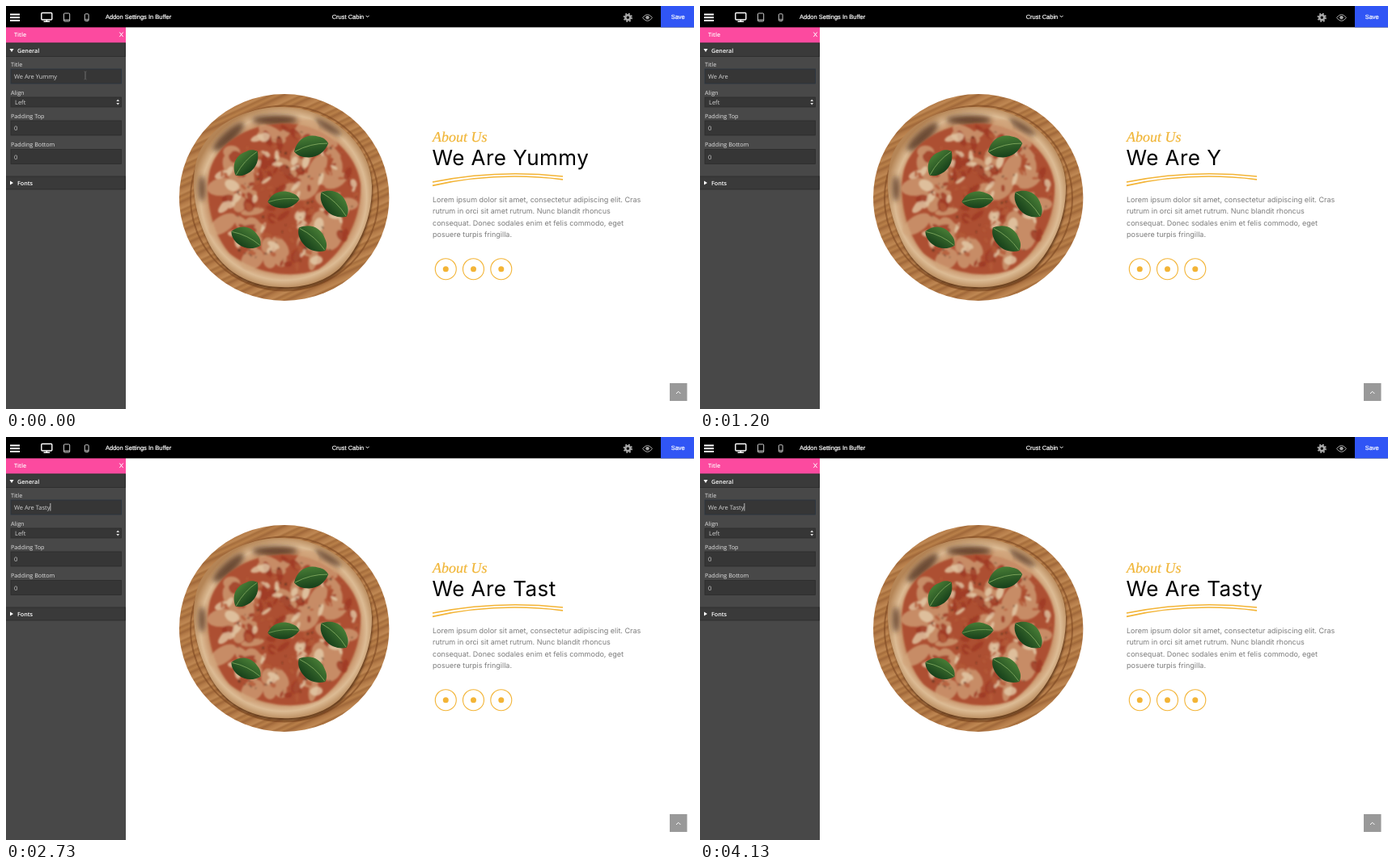
Animation, 850 px wide and 499 px high, one loop 4.19 s. Source, as an HTML page:

```html
<!DOCTYPE html>
<html lang="en">
<head>
<meta charset="utf-8">
<title>Page builder</title>
<style>
  html, body { margin: 0; width: 100%; height: 100%; overflow: hidden; background: #fff; }
  svg { display: block; width: 850px; height: 499px; }
  text { white-space: pre; text-rendering: geometricPrecision; }
  .bar { font: 7.5px "Liberation Sans", Arial, sans-serif; fill: #fff; stroke: #fff; stroke-width: .2; }
  .panel { font: 7.2px "Open Sans", sans-serif; fill: #e2e2e2; }
  .panel .head { font-weight: 600; fill: #fff; }
  .panel .value { font-size: 7.5px; fill: #d2d2d2; }
  .box { fill: #363636; stroke: #2c2c2c; stroke-width: .8; }
  .script { font: italic 18px "Liberation Serif", serif; fill: #f0b537; stroke: #f0b537; stroke-width: .2; }
  .heading { font: 26px Inter, sans-serif; letter-spacing: .45px; fill: #000; }
  .copy { font: 9px Inter, sans-serif; fill: #7c7c7c; }
  .line { fill: none; stroke: #fff; }
  .gold { fill: none; stroke: #f3b436; }
</style>
</head>
<body>
<svg viewBox="0 0 850 499">
  <defs>
    <linearGradient id="wood" gradientUnits="userSpaceOnUse" x1="0" y1="0" x2="7" y2="15" spreadMethod="repeat">
      <stop offset="0" stop-color="#b47b48"/>
      <stop offset=".25" stop-color="#bf8853"/>
      <stop offset=".4" stop-color="#a56d3c"/>
      <stop offset=".6" stop-color="#b98049"/>
      <stop offset=".8" stop-color="#a0683a"/>
      <stop offset="1" stop-color="#b47b48"/>
    </linearGradient>
    <radialGradient id="crust" gradientUnits="userSpaceOnUse" cx="343" cy="237" r="114">
      <stop offset=".76" stop-color="#b9774c"/>
      <stop offset=".9" stop-color="#dcbb94"/>
      <stop offset="1" stop-color="#b58556"/>
    </radialGradient>
    <linearGradient id="leaf" x1="0" y1="0" x2="0" y2="1">
      <stop offset="0" stop-color="#477c35"/>
      <stop offset="1" stop-color="#17401a"/>
    </linearGradient>
    <filter id="soft"><feGaussianBlur stdDeviation=".8"/></filter>
    <filter id="softer"><feGaussianBlur stdDeviation="3"/></filter>
    <path id="dough" d="M338 125C400 124 451 170 452 222C453 262 436 300 412 325C385 349 350 350 325 347C290 342 262 322 247 286C233 255 226 215 238 183C254 146 296 126 338 125Z"/>
    <clipPath id="inDough"><use href="#dough"/></clipPath>
    <g id="basil">
      <path d="M-20 3C-15-10-3-16 10-10C16-8 18-5 20-1C15 8 6 13-4 12C-12 11-17 8-20 3Z" fill="url(#leaf)"/>
      <path d="M-19 3Q0-4 19-1" fill="none" stroke="#7fa75e" stroke-width=".8"/>
    </g>
  </defs>

  <rect width="850" height="499" fill="#fff"/>

  <!-- Pizza picture -->
  <ellipse cx="343.7" cy="237" rx="129.7" ry="128" fill="url(#wood)"/>
  <ellipse cx="344" cy="238" rx="116" ry="114.5" fill="none" stroke="#7d4822" stroke-width="2" opacity=".6"/>
  <use href="#dough" fill="#4a2611" opacity=".65" transform="translate(1 3)" filter="url(#soft)"/>
  <use href="#dough" fill="url(#crust)"/>
  <g clip-path="url(#inDough)">
    <g fill="#4f2d1a" opacity=".8" filter="url(#softer)">
      <ellipse cx="275" cy="162" rx="25" ry="7" transform="rotate(-42 275 162)"/>
      <ellipse cx="332" cy="141" rx="28" ry="6"/>
      <ellipse cx="398" cy="150" rx="19" ry="4" transform="rotate(32 398 150)"/>
      <ellipse cx="242" cy="226" rx="4" ry="16"/>
    </g>
    <path d="M335 146C388 141 433 179 438 220C440 266 414 308 386 326C350 340 304 329 276 306C252 278 245 230 252 203C263 167 299 149 335 146Z" fill="#ad4f33" filter="url(#soft)"/>
    <g id="toppings" filter="url(#soft)"></g>
  </g>
  <use href="#basil" transform="translate(296.500 194) rotate(-42)"/>
  <use href="#basil" transform="translate(377 174) rotate(-8) scale(1.08)"/>
  <use href="#basil" transform="translate(343 240) scale(.98 .85)"/>
  <use href="#basil" transform="translate(406 245) rotate(50) scale(1.08)"/>
  <use href="#basil" transform="translate(297 287) rotate(32)"/>
  <use href="#basil" transform="translate(379 288) rotate(47) scale(1.08)"/>

  <!-- Page copy -->
  <text class="script" x="527" y="168">About Us</text>
  <text class="heading" id="heading" x="526.500" y="197"></text>
  <g class="gold" stroke-width="1.700">
    <path d="M527 218Q606 202 688 211"/>
    <path d="M527 222.300Q606 204.500 688 214.800"/>
  </g>
  <g class="copy">
    <text x="527" y="243">Lorem ipsum dolor sit amet, consectetur adipiscing elit. Cras</text>
    <text x="527" y="257.400">rutrum in orci sit amet rutrum. Nunc blandit rhoncus</text>
    <text x="527" y="271.800">consequat. Donec sodales enim et felis commodo, eget</text>
    <text x="527" y="286.200">posuere turpis fringilla.</text>
  </g>
  <g class="gold" stroke-width="1.100">
    <circle cx="543.300" cy="325.700" r="13"/>
    <circle cx="577.500" cy="325.700" r="13"/>
    <circle cx="611.800" cy="325.700" r="13"/>
  </g>
  <g fill="#f3b436">
    <circle cx="543.300" cy="325.700" r="3.500"/>
    <circle cx="577.500" cy="325.700" r="3.500"/>
    <circle cx="611.800" cy="325.700" r="3.500"/>
  </g>
  <rect x="820" y="467" width="21.500" height="22" fill="#999"/>
  <path class="line" d="M828 480l2.700-2.700 2.700 2.700"/>

  <!-- Settings panel -->
  <rect y="26" width="148" height="473" fill="#484848"/>
  <rect y="26" width="148" height="19.500" fill="#fc4a9f"/>
  <g fill="#3a3a3a" stroke="#2b2b2b" stroke-width=".8">
    <rect x="-1" y="46" width="148.600" height="16.500"/>
    <rect x="-1" y="211" width="148.600" height="16"/>
  </g>
  <path d="M4.500 53h5l-2.500 4zM5 216.500v5l4-2.500z" fill="#fff"/>
  <rect class="box" x="6" y="78" width="136.500" height="18" style="stroke:#2a3440"/>
  <rect class="box" x="6" y="113" width="136.500" height="12"/>
  <rect class="box" x="6" y="142" width="136.500" height="18"/>
  <rect class="box" x="6" y="177.500" width="136.500" height="18"/>
  <path d="M136.300 118l1.900-2.500 1.900 2.500zM136.300 120l1.900 2.500 1.900-2.500z" fill="#ddd"/>
  <g class="panel">
    <text class="head" x="10" y="37.500">Title</text>
    <text class="head" x="14" y="58">General</text>
    <text x="6" y="74.500">Title</text>
    <text class="value" id="field" x="10" y="89.500"></text>
    <text x="6" y="110">Align</text>
    <text class="value" x="11" y="121.500">Left</text>
    <text x="6" y="139">Padding Top</text>
    <text class="value" x="10" y="154">0</text>
    <text x="6" y="174.300">Padding Bottom</text>
    <text class="value" x="10" y="189.500">0</text>
    <text class="head" x="14" y="222">Fonts</text>
  </g>
  <path class="line" d="M140.300 32.500l4.400 5.600m0-5.600l-4.400 5.600"/>
  <rect id="caret" y="82" width=".8" height="9.500" fill="#ddd"/>
  <path id="beam" d="M-1.500-5Q0-5 0-3.500V3.500Q0 5-1.500 5M1.500-5Q0-5 0-3.500V3.500Q0 5 1.500 5" fill="none" stroke="#666" stroke-width=".8"/>
  <path id="arrow" d="M0 0v8l1.800-1.700 1.300 2.900 1.400-.6-1.300-2.800h2.500z" fill="#111" stroke="#fff" stroke-width=".7"/>

  <!-- Top bar -->
  <rect width="850" height="26.400" fill="#000"/>
  <rect x="809" width="41" height="26.400" fill="#3055f5"/>
  <path class="line" stroke-width="2" d="M5 10.500h12M5 14.300h12M5 18.100h12"/>
  <rect class="line" x="43.800" y="8.500" width="13" height="8.500" rx="1" stroke-width="1.400"/>
  <path class="line" stroke-width="1.500" d="M50.300 17v2M46.500 19.300h7.600"/>
  <g stroke="#ccc" fill="none">
    <rect x="71.500" y="9" width="7.200" height="10" rx="1"/>
    <path d="M72 17.200h6.500"/>
    <rect x="97.300" y="9.800" width="4.800" height="8.700" rx="1"/>
    <path d="M97.500 16.800h4.500"/>
  </g>
  <text class="bar" x="123" y="16">Addon Settings In Buffer</text>
  <text class="bar" x="402.700" y="15.500">Crust Cabin</text>
  <path class="line" d="M444.600 11.800l2 2 2-2"/>
  <text class="bar" x="821.700" y="16">Save</text>
  <g fill="none" stroke="#aaa">
    <circle cx="768.300" cy="14.300" r="3" stroke-width="2.600"/>
    <circle cx="768.300" cy="14.300" r="4.800" stroke-width="1.800" stroke-dasharray="1.885"/>
    <path d="M786.500 14.500Q792.500 6.500 798.500 14.500Q792.500 22.500 786.500 14.500Z"/>
    <circle cx="792.500" cy="14.300" r="1.800" fill="#aaa"/>
  </g>
</svg>

<script>
const LOOP = 4190, STEP = 200 / 3, LAG = 200;
const PREFIX = "We Are ";
const typing = [
  [0, "Yummy"], [200, "Yumm"], [370, "Yum"], [530, "Yu"], [800, "Y"], [1060, ""],
  [1530, "T"], [1800, "Ta"], [2070, "Tas"], [2330, "Tast"], [2600, "Tasty"]
];
const caretOn = [[130, 1130], [1530, 3130], [3630, LOOP]];
const pointer = [[2930, 98, 86], [3180, 132, 67], [3400, 132, 67], [3700, 98, 86]];

const el = id => document.getElementById(id);
const [heading, field, caret, beam, arrow] =
  ["heading", "field", "caret", "beam", "arrow"].map(el);

const show = (node, on) => node.setAttribute("visibility", on ? "visible" : "hidden");
const setText = (node, text) => { if (node.textContent !== text) node.textContent = text; };
const typedAt = t => PREFIX + typing.filter(([at]) => at <= Math.max(t, 0)).pop()[1];

function pointerAt(t) {
  if (t < 200) return [98, 86];
  const i = pointer.findIndex(([at]) => at > t);
  if (i < 1) return null;
  const [t0, x0, y0] = pointer[i - 1], [t1, x1, y1] = pointer[i];
  const p = (t - t0) / (t1 - t0), ease = p * p * (3 - 2 * p);
  return [x0 + (x1 - x0) * ease, y0 + (y1 - y0) * ease];
}

function addToppings() {
  let seed = 11;
  const rand = () => (seed = seed * 16807 % 2147483647) / 2147483647;
  const scatter = (count, color, size, opacity) => {
    let shapes = "";
    for (let i = 0; i < count; i++) {
      const a = rand() * Math.PI * 2, r = Math.sqrt(rand()) * 88;
      const x = 345 + Math.cos(a) * r, y = 236 + Math.sin(a) * r;
      const rx = size * (.5 + rand()), ry = rx * (.3 + rand() * .5);
      shapes += `<ellipse cx="${x}" cy="${y}" rx="${rx}" ry="${ry}" transform="rotate(${rand() * 180} ${x} ${y})"/>`;
    }
    return `<g fill="${color}" opacity="${opacity}">${shapes}</g>`;
  };
  el("toppings").innerHTML =
    scatter(60, "#d2a57d", 13, .7) + scatter(50, "#9c3520", 7, .75) +
    scatter(45, "#e6d0ae", 7, .75) + scatter(60, "#b45a38", 4, .8) +
    scatter(60, "#4a2a1a", 1.4, .75);
}

function draw() {
  const t = Math.floor(performance.now() % LOOP / STEP + .01) * STEP;
  setText(field, typedAt(t));
  setText(heading, typedAt(t - LAG));
  caret.setAttribute("x", 10 + field.getComputedTextLength());
  show(caret, caretOn.some(([from, to]) => t >= from && t < to));

  const at = pointerAt(t), inField = at && at[1] > 78;
  show(beam, at && inField);
  show(arrow, at && !inField);
  if (at) (inField ? beam : arrow).setAttribute("transform", `translate(${at})`);
  requestAnimationFrame(draw);
}

addToppings();
draw();
</script>
</body>
</html>
```
